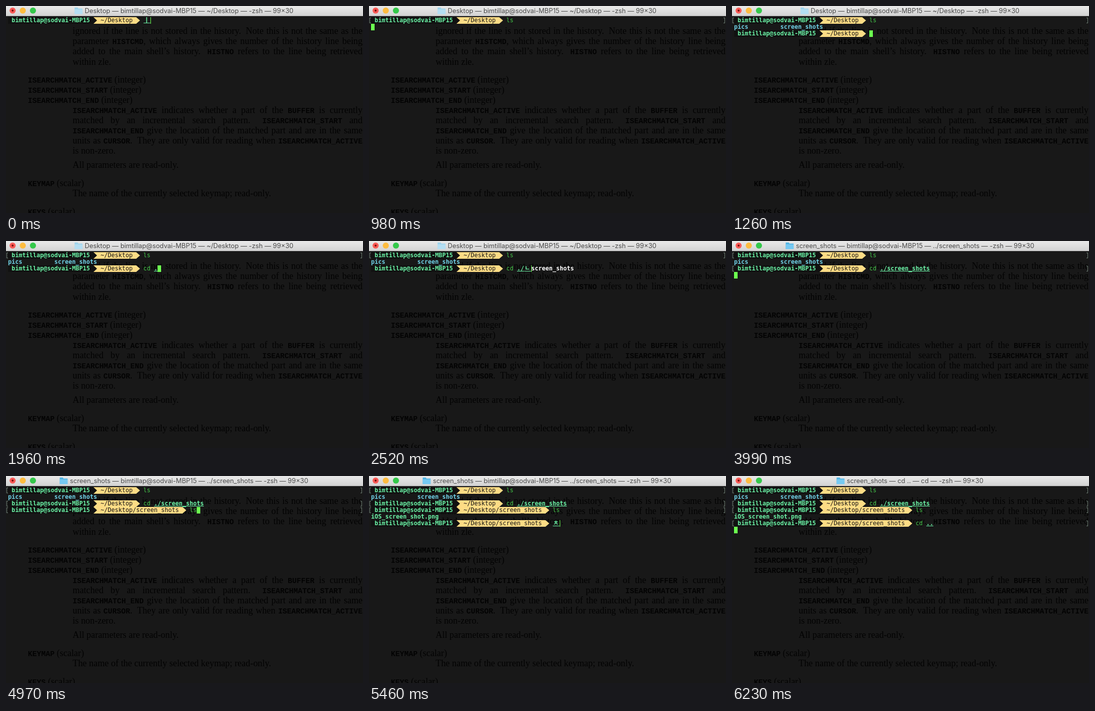
These frames come from a looping animation (702x408 px, 6300 ms). An HTML page with a canvas:

```html
<!DOCTYPE html>
<html lang="en">
<head>
<meta charset="utf-8">
<title>Terminal</title>
<style>
  html, body { margin: 0; width: 100%; height: 100%; overflow: hidden; background: #181818; }
  canvas { display: block; }
</style>
</head>
<body>
<canvas id="stage" width="702" height="408"></canvas>
<script>
const ctx = document.getElementById('stage').getContext('2d');
const W = 702, H = 408, LOOP = 6300, STEP = 70;
const CELL = 7, ROW = 13, LEFT = 4, TOP = 22, BAR = 20;
const MINT = '#6bf3a6', GREEN = '#45c649', CURSOR = '#6cff50', CYAN = '#6fd0e6';
const YELLOW = '#fddc85', BLACK = '#111', BACK = '#181818', INK = '#030303';
const MONO = '11.63px "DejaVu Sans Mono", monospace';
const JAMO = 'bold 12px "Noto Sans CJK KR", "Noto Sans CJK", sans-serif';
const SERIF = '17.9px "Liberation Serif", serif';
const CODE = 'bold 14.56px "Liberation Mono", monospace';
const USER = 'bimtillap@sodvai-MBP15';

// Each edit: [time, typed text, syllable being composed, suggestion]
const prompts = [
  { row: 0, from: 0, enter: 980, path: '~/Desktop',
    edits: [[0, '', 'ㅣ'], [140, 'l', ''], [210, 'l', 'ㄴ'], [630, 'ls', '']] },
  { row: 2, from: 1120, enter: 3920, path: '~/Desktop',
    edits: [[1120, '', ''], [1400, '', 'ㅊ'], [1540, 'c', 'ㅇ'], [1750, 'cd', ''], [1820, 'cd ', ''],
            [1960, 'cd .', ''], [2170, 'cd ./', ''], [2450, 'cd ./', 'ㄴ', 'screen_shots'],
            [2800, 'cd ./screen_shots', '']] },
  { row: 3, from: 4130, enter: 4970, path: '~/Desktop/screen_shots', keepCursor: true,
    edits: [[4130, '', ''], [4410, '', 'ㅣ'], [4620, 'l', 'ㄴ'], [4830, 'ls', '']] },
  { row: 5, from: 5110, enter: 6160, path: '~/Desktop/screen_shots',
    edits: [[5110, '', ''], [5390, '', 'ㅊ'], [5530, 'c', 'ㅇ'], [5670, 'cd', ''], [5740, 'cd ', ''],
            [5880, 'cd .', ''], [6020, 'cd ..', '']] }
];

const outputs = [
  { row: 1, from: 1050, col: 0, text: 'pics', color: CYAN },
  { row: 1, from: 1050, col: 13, text: 'screen_shots', color: CYAN },
  { row: 4, from: 5040, col: 0, text: 'iOS_screen_shot.png', color: MINT }
];

const titles = [
  [0, `Desktop — ${USER} — ~/Desktop — -zsh — 99×30`],
  [3920, `screen_shots — ${USER} — ../screen_shots — -zsh — 99×30`],
  [6160, 'screen_shots — cd .. — cd — -zsh — 99×30']
];

// Manual page showing through the window: [x, baseline, text, justified]
const page = [
  [131, 55, 'ignored if the line is not stored in the history. Note this is not the same as the', true],
  [131, 75, 'parameter HISTCMD, which always gives the number of the history line being', true],
  [131, 95, 'added to the main shell’s history. HISTNO refers to the line being retrieved', true],
  [131, 115.5, 'within zle.'],
  [43, 151, 'ISEARCHMATCH_ACTIVE (integer)'],
  [43, 171, 'ISEARCHMATCH_START (integer)'],
  [43, 191, 'ISEARCHMATCH_END (integer)'],
  [131, 211, 'ISEARCHMATCH_ACTIVE indicates whether a part of the BUFFER is currently', true],
  [131, 231, 'matched by an incremental search pattern. ISEARCHMATCH_START and', true],
  [131, 251, 'ISEARCHMATCH_END give the location of the matched part and are in the same', true],
  [131, 271, 'units as CURSOR. They are only valid for reading when ISEARCHMATCH_ACTIVE', true],
  [131, 291, 'is non-zero.'],
  [131, 319, 'All parameters are read-only.'],
  [43, 355, 'KEYMAP (scalar)'],
  [131, 375, 'The name of the currently selected keymap; read-only.'],
  [43, 411, 'KEYS (scalar)']
];

const colX = col => LEFT + col * CELL;
const rowY = row => TOP + row * ROW;
const latest = (list, t) => list.filter(item => item[0] <= t).pop();

function rect(x, y, w, h, color) {
  ctx.fillStyle = color;
  ctx.fillRect(x, y, w, h);
}

function shape(points, color) {
  ctx.fillStyle = color;
  ctx.beginPath();
  points.forEach(([x, y]) => ctx.lineTo(x, y));
  ctx.fill();
}

function disc(x, y, r, color) {
  ctx.fillStyle = color;
  ctx.beginPath();
  ctx.arc(x, y, r, 0, Math.PI * 2);
  ctx.fill();
}

function write(text, x, y, font, color) {
  ctx.font = font;
  ctx.fillStyle = color;
  ctx.fillText(text, x, y);
  return ctx.measureText(text).width;
}

function cells(text, col, row, color, bold) {
  write(text, colX(col), rowY(row) + 9.6, (bold ? 'bold ' : '') + MONO, color);
}

function widthOf(text, font) {
  ctx.font = font;
  return ctx.measureText(text).width;
}

function drawPageLine([x, y, text, justified]) {
  const words = text.split(' ').map(word => {
    const code = (word.match(/^[A-Z_]{4,}/) || [''])[0];
    const rest = word.slice(code.length);
    return { code, rest, width: widthOf(code, CODE) + widthOf(rest, SERIF) };
  });
  // A sentence end takes a wider share of the spare room.
  const weight = word => word.rest.endsWith('.') ? 1.7 : 1;
  const spare = W - 1 - x - words.reduce((sum, word) => sum + word.width, 0);
  const shares = words.slice(0, -1).reduce((sum, word) => sum + weight(word), 0);
  const gap = justified ? spare / shares : widthOf(' ', SERIF);
  for (const word of words) {
    write(word.code, x, y, CODE, INK);
    write(word.rest, x + widthOf(word.code, CODE), y, SERIF, INK);
    x += word.width + gap * (justified ? weight(word) : 1);
  }
}

function drawTitleBar(t) {
  const shade = ctx.createLinearGradient(0, 0, 0, BAR);
  shade.addColorStop(0, '#e9e9e9');
  shade.addColorStop(1, '#d2d2d2');
  rect(0, 0, W, BAR, shade);
  rect(0, BAR - 1, W, 1, '#b4b4b4');
  ['#fc5b57', '#fdbc40', '#34c84a'].forEach((color, i) => disc(13 + 20 * i, 9, 6, color));
  disc(13, 9, 2, '#7a120f');

  const [since, title] = latest(titles, t);
  const font = '12.8px Inter, sans-serif';
  const x = (W - 2 - widthOf(title, font) - 20) / 2;
  const [back, front] = since ? ['#53b4e4', '#75c9f2'] : ['#9fd3ec', '#b4def2'];
  shape([[x, 3], [x + 6, 3], [x + 7.5, 5], [x + 15.5, 5], [x + 15.5, 16], [x, 16]], back);
  rect(x, 6.5, 15.5, 9.5, front);
  write(title, x + 20, 14, font, '#4b4b4b');
}

function drawSegments({ row, path }) {
  const y = rowY(row), mid = y + ROW / 2, end = y + ROW;
  const start = colX(24), tip = colX(27 + path.length);
  rect(LEFT, y, start - LEFT, ROW, BLACK);
  rect(start, y, tip - start, ROW, YELLOW);
  shape([[start, y], [start + CELL, mid], [start, end]], BLACK);
  shape([[tip, y], [tip + CELL + 0.5, mid], [tip, end]], YELLOW);
}

function drawPrompt(prompt, t) {
  const { row, path, edits, enter, keepCursor } = prompt;
  const y = rowY(row);
  const [, typed, composing, hint] = latest(edits, t);
  const [command, ...args] = typed.split(' ');
  const arg = args.join(' ');
  const start = 29 + path.length;
  let col = start + typed.length;

  cells(USER, 1, row, MINT, true);
  cells(path, 26, row, '#111');
  cells(command, start, row, GREEN);
  if (arg) {
    const argCol = start + command.length + 1;
    cells(arg, argCol, row, MINT, true);
    rect(colX(argCol), y + 11, arg.length * CELL, 1, MINT);
  }
  if (t >= enter) {
    for (const x of [1, 697]) {
      rect(x === 1 ? 1 : 699, y + 1, 1, 11, '#6d7d74');
      rect(x, y + 1, 3, 1, '#6d7d74');
      rect(x, y + 11, 3, 1, '#6d7d74');
    }
  }
  if (composing) {
    write(composing, colX(col) + 1, y + 10, JAMO, MINT);
    rect(colX(col) + 0.5, y + 11, CELL * 2 - 1, 1, MINT);
    col += 2;
    rect(colX(col), y, 1, ROW, CURSOR);
    if (hint) cells(hint, col, row, '#fff', true);
  } else if (t < enter || (keepCursor && t < enter + STEP)) {
    rect(colX(col), y, CELL, ROW, CURSOR);
  }
}

function drawWaitingCursor(shown, t) {
  const last = shown[shown.length - 1];
  if (t < last.enter + (last.keepCursor ? STEP : 0)) return;
  const below = outputs.filter(o => o.from <= t && o.row > last.row).length ? 2 : 1;
  rect(LEFT, rowY(last.row + below), CELL, ROW, CURSOR);
}

function draw(t) {
  rect(0, 0, W, H, BACK);
  page.forEach(drawPageLine);
  const shown = prompts.filter(p => p.from <= t);
  shown.forEach(drawSegments);
  outputs.filter(o => o.from <= t).forEach(o => cells(o.text, o.col, o.row, o.color, true));
  shown.forEach(p => drawPrompt(p, t));
  drawWaitingCursor(shown, t);
  drawTitleBar(t);
}

function tick() {
  const t = performance.now() % LOOP;
  draw(Math.floor(t / STEP) * STEP);
  requestAnimationFrame(tick);
}
tick();
</script>
</body>
</html>
```
